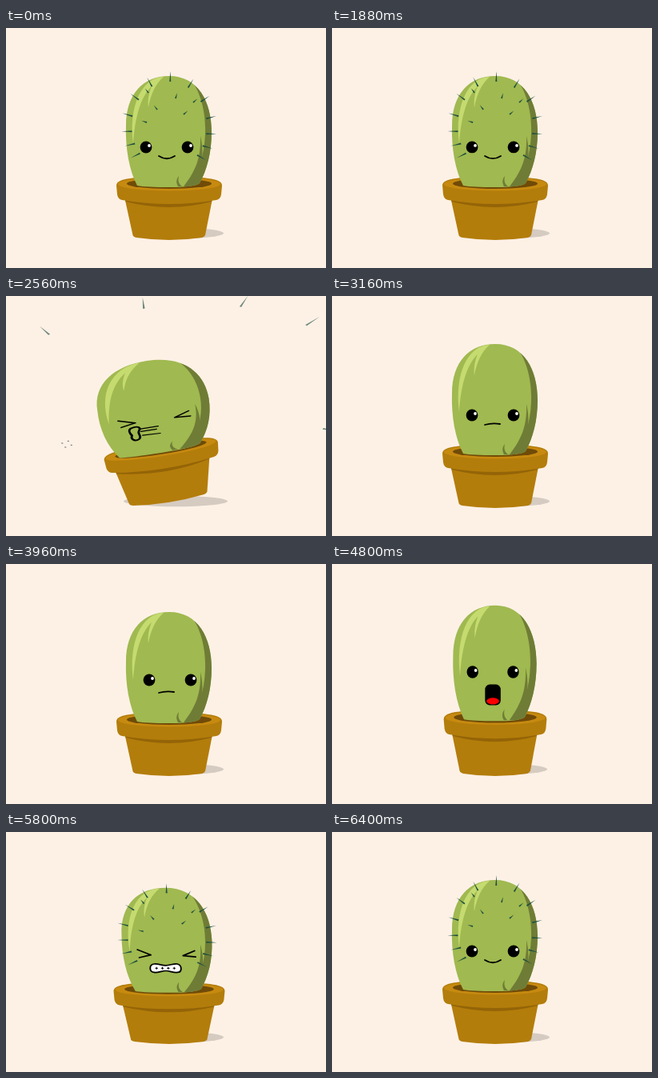
An HTML page with a canvas that plays this animation: 400x300 px, repeating every 6760 ms.

```html
<!DOCTYPE html>
<html lang="en">
<head>
<meta charset="utf-8">
<title>Sneezing cactus</title>
<style>
html, body { margin: 0; width: 100%; height: 100%; overflow: hidden; background: #fdf1e6; }
canvas { display: block; }
</style>
</head>
<body>
<canvas id="stage" width="400" height="300"></canvas>
<script>
const ctx = document.getElementById('stage').getContext('2d');
const LOOP = 6760, STEP = 40, LAUNCH = 2400, REGROW = 5360, TAU = Math.PI * 2;

const shape = d => new Path2D(d);
const pot = shape('M148 211L158.5 259Q159 261 163 262Q204 268 245 262Q248 261 249 259L258.5 211Z');
const band = shape('M148 211L149.5 217Q204 231 257 217L258.5 211Z');
const rim = shape('M138 197C138 189 152 186 204 186S270 189 270 197L269 208Q268 214 263 215Q204 225 145 215Q140 214 139 208Z');
const body = shape('M164 197C154 178 149 150 150 122C150 82 172 60 204 60C240 60 257 92 257 130C257 156 251 178 242 194Q236 199 204 199Q176 199 164 197Z');
const light = shape('M197 61C169 62 153 98 159 145C161 113 168 86 182 73C178 82 177 92 178 99C181 82 187 70 197 61Z');
const dark = shape('M229 62C243 78 250 105 249 132C248 160 240 182 226 198L240 198C252 180 259 155 258 130C257 95 246 68 229 62Z');
const folds = shape('M243 135C244 160 238 178 222 198L230 198C244 180 249 160 243 135ZM216 185C212 190 213 194 215 198L220 198C215 194 215 190 216 185Z');
const teeth = shape('M187 161C192 160 196 163 201 163S211 160 215 161C221 163 220 172 215 172C210 173 206 170 201 170S191 173 187 172C181 172 181 162 187 161Z');

// A ring of long spines, denser at the sides, and a few short ones inside it.
const spines = Array.from({ length: 13 }, (_, i) => {
  const a = (141 + 21.75 * i - 14 * Math.sin(TAU * i / 12)) * Math.PI / 180;
  return makeSpine(204 + 47 * Math.cos(a), 122 + 55 * Math.sin(a), 13, 1);
});
for (const [x, y] of [[178, 81], [189, 102], [176, 118], [234, 93], [222, 108], [212, 88]])
  spines.push(makeSpine(x, y, 7, 2));

function makeSpine(x, y, len, speed) {
  const dx = x - 204, dy = .7 * (y - 130), d = Math.hypot(dx, dy);
  return { x, y, dx: dx / d, dy: dy / d, len, speed };
}

const during = (t, a, b) => t >= a && t < b;
const ramp = (t, a, b) => {
  const u = Math.min(1, Math.max(0, (t - a) / (b - a)));
  return u * u * (3 - 2 * u);
};

function fill(color, path) {
  ctx.fillStyle = color;
  ctx.fill(path);
}

function line(d, width = 1.8, color = '#000') {
  ctx.strokeStyle = color;
  ctx.lineWidth = width;
  ctx.stroke(shape(d));
}

function oval(color, x, y, rx, ry = rx) {
  const p = new Path2D();
  p.ellipse(x, y, rx, ry, 0, 0, TAU);
  fill(color, p);
}

function scaleAt(x, y, sx, sy) {
  ctx.translate(x, y);
  ctx.scale(sx, sy);
  ctx.translate(-x, -y);
}

function drawSpines(t) {
  if (during(t, 2720, REGROW)) return;
  const grown = t < REGROW ? 1 : ramp(t, REGROW - 60, 5840);
  const u = t < REGROW ? Math.max(0, (t - LAUNCH) / 160) : 0;
  ctx.globalAlpha = 1 - .35 * Math.min(u, 1);
  for (const s of spines) {
    const x = s.x + s.dx * 140 * s.speed * u, y = s.y + s.dy * 85 * s.speed * u;
    const len = s.len * grown * (1 + .3 * u);
    fill('#1f5040', shape(`M${x + s.dx * len} ${y + s.dy * len}L${x - s.dy} ${y + s.dx}L${x + s.dy} ${y - s.dx}Z`));
  }
  ctx.globalAlpha = 1;
}

function spit(t) {
  if (!during(t, LAUNCH, 2720)) return;
  const u = (t - LAUNCH) / 160;
  for (let i = 0; i < 4; i++) {
    const a = TAU * i / 4 + .3;
    line(`M${160 - 85 * u + 6 * Math.cos(a)} ${172 + 13 * u + 4 * Math.sin(a)}l2 .4`, 1.1, '#666');
  }
}

function eyes(t) {
  if (during(t, 2200, 2720) || during(t, 5280, 6040)) {
    line('M168 142L184 149L170 152.5');
    line('M236 143.5L222 150L237 151.5');
    return;
  }
  if ([600, 1560, 4360, 6280].some(s => during(t, s, s + 120))) {
    line('M168 150Q175 153 182 150M220 150Q227 153 234 150');
    return;
  }
  const look = ramp(t, 3440, 3720) - ramp(t, 3880, 4160);
  const lift = ramp(t, 4660, 4800) - ramp(t, 5160, 5280);
  for (const x of [175, 227]) {
    const ex = x + 5 * look, ey = 149 - 5 * look - 9 * lift;
    oval('#000', ex, ey, 7.4);
    oval('#fff', ex + 4, ey - 2, 1.9);
  }
}

function mouth(t) {
  if (during(t, 2120, LAUNCH)) {
    const u = ramp(t, 2080, 2360);
    oval('#000', 200, 162 + 2 * u, 5 + 3 * u, 2 + 7 * u);
  } else if (during(t, LAUNCH, 2720)) {
    line('M179 156C186 153 189 157 186 162C184 166 189 170 185 174C180 177 177 171 179 167C177 163 176 158 179 156Z', 2.2);
    if (t < 2640) line('M187 159L205 159M188 163L203 163M189 169L206 170', 1.4);
  } else if (during(t, 4720, 5280)) {
    const h = 25 * ramp(t, 4680, 4800), y = 167.5 - h / 2;
    const hole = new Path2D();
    hole.roundRect(191, y, 20, h, Math.min(6, h / 2));
    fill('#000', hole);
    oval('#f00', 201, y + h - 5, 8, 4);
  } else if (during(t, 5280, 6040)) {
    fill('#fff', teeth);
    ctx.lineWidth = 1.8;
    ctx.stroke(teeth);
    for (let x = 190; x < 215; x += 7) line(`M${x - 1.3} 166.5h2.6m-1.3 -1.3v2.6`, 1);
  } else if (during(t, 1960, 4720)) {
    line('M191 161Q200 158.5 210 160');
  } else {
    line('M191 160Q201 166.5 211 160');
  }
}

function draw(t) {
  const after = Math.max(0, t - 2560);
  const inhale = ramp(t, 1860, 2360) - ramp(t, 2360, 2440);
  const sneeze = ramp(t, 2360, 2440) * Math.exp(-after / 170) * Math.cos(TAU * after / 480) * (1 - ramp(t, 2560, 3200));
  const gasp = ramp(t, 4660, 4940) - ramp(t, 5120, 5300);
  const strain = ramp(t, 5260, 5400) - ramp(t, 5760, 6080);
  const lean = .035 * strain * Math.cos(TAU * (t - 5400) / 160);

  const sx = 1 - .05 * inhale + .09 * sneeze - .05 * gasp + .055 * strain;
  const sy = 1 + .07 * inhale - .05 * sneeze + .08 * gasp - .03 * strain;
  const tilt = 4 * inhale - 9 * sneeze;
  const pivot = tilt < 0 ? 159 : 249;

  ctx.fillStyle = '#fdf1e6';
  ctx.fillRect(0, 0, 400, 300);
  oval('#d5cbc1', 217 - 5 * sneeze - 6 * gasp, 256.5, 55 + 10 * sneeze, 6.8);

  ctx.save();
  ctx.lineCap = ctx.lineJoin = 'round';
  ctx.translate(pivot, 262);
  ctx.rotate(tilt * Math.PI / 180);
  ctx.translate(-pivot, -262);
  scaleAt(204, 265, sx, sy);

  fill('#b37d0b', pot);
  fill('#946407', band);
  fill('#b37d0b', rim);
  oval('#c78a10', 204, 195, 64, 8.5);
  oval('#704b08', 204, 194.5, 53, 6.5);

  scaleAt(204, 198, 1 + .2 * sneeze, 1 - .12 * sneeze - .03 * strain);
  ctx.transform(1, 0, -lean, 1, 198 * lean, 0);
  fill('#a0b950', body);
  ctx.save();
  ctx.clip(body);
  fill('#c5db70', light);
  fill('#6f7c36', dark);
  fill('#6f7c36', folds);
  ctx.restore();
  drawSpines(t);
  eyes(t);
  mouth(t);
  ctx.restore();

  spit(t);
}

const start = performance.now();
function tick() {
  const t = (performance.now() - start) % LOOP;
  draw(Math.floor(t / STEP) * STEP);
  requestAnimationFrame(tick);
}
tick();
</script>
</body>
</html>
```
